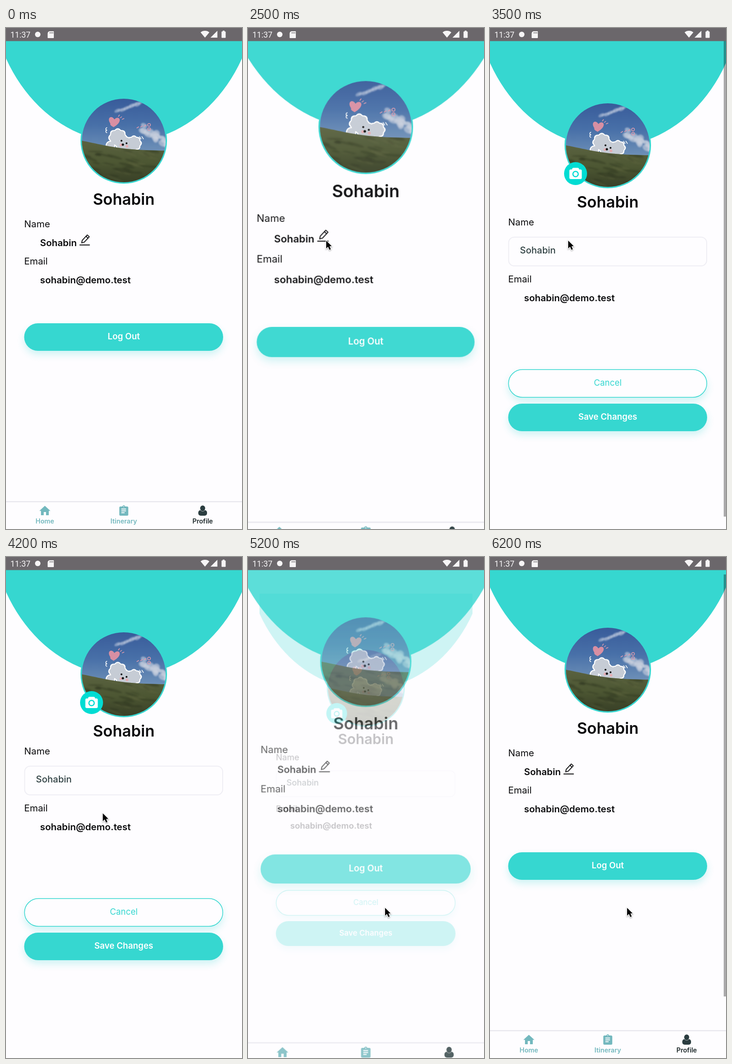
An HTML page with a canvas that plays this animation: 513 px wide and 1091 px high, repeating every 6.3 s.

```html
<!DOCTYPE html>
<html lang="en">
<head>
<meta charset="utf-8">
<title>Profile screen</title>
<style>
  html, body { margin: 0; width: 100%; height: 100%; overflow: hidden; background: #fefdff; }
  canvas { display: block; width: 513px; height: 1091px; }
</style>
</head>
<body>
<canvas id="stage" width="513" height="1091"></canvas>
<script>
const W = 513, H = 1091, BAR = 28, MID = 256, LOOP = 6300, STEP = 100;
const TEAL = '#36d7d0', BADGE = '#02dcd3', PAPER = '#fefdff', INK = '#0b0b0d';
const MUTED = '#73b8be', DARK = '#2b3d40', GREY = '#6b676b', WHITE = '#f6f5f6';
const USER = 'Sohabin', MAIL = 'sohabin@demo.test';
const ctx = document.getElementById('stage').getContext('2d');

// Motion helpers
const ramp = (t, start, length) => Math.min(1, Math.max(0, (t - start) / length));
const mix = (a, b, p) => a + (b - a) * p;
const smooth = p => p * p * (3 - 2 * p);
const easeOut = (p, power) => 1 - (1 - p) ** power;

function seeded(seed) {
  return () => (seed = seed * 16807 % 2147483647) / 2147483647;
}

// Drawing helpers
function text(c, str, x, y, size, weight = 400, color = INK, align = 'left') {
  c.font = `${weight} ${size}px Inter, sans-serif`;
  c.fillStyle = color;
  c.textAlign = align;
  c.fillText(str, x, y);
}

function oval(c, x, y, rx, ry, turn, color) {
  c.fillStyle = color;
  c.beginPath();
  c.ellipse(x, y, rx, ry, turn, 0, Math.PI * 2);
  c.fill();
}

const disc = (c, x, y, r, color) => oval(c, x, y, r, r, 0, color);

function box(c, x, y, w, h, r, color) {
  c.fillStyle = color;
  c.beginPath();
  c.roundRect(x, y, w, h, r);
  c.fill();
}

function frame(c, x, y, w, h, r, color, width) {
  c.strokeStyle = color;
  c.lineWidth = width;
  c.beginPath();
  c.roundRect(x, y, w, h, r);
  c.stroke();
}

function line(c, x, y, dx, dy) {
  c.beginPath();
  c.moveTo(x, y);
  c.lineTo(x + dx, y + dy);
  c.stroke();
}

function gradient(c, y0, y1, ...colors) {
  const g = c.createLinearGradient(0, y0, 0, y1);
  colors.forEach((color, i) => g.addColorStop(i / (colors.length - 1), color));
  return g;
}

function button(c, y, h, label, outlined) {
  c.save();
  c.shadowColor = 'rgba(54,215,208,.24)';
  c.shadowBlur = 16;
  c.shadowOffsetY = 8;
  box(c, 39.5, y, 432.5, h, h / 2, outlined ? PAPER : TEAL);
  c.restore();
  if (outlined) frame(c, 40.25, y + .75, 431, h - 1.5, h / 2, TEAL, 1.5);
  text(c, label, MID, y + h / 2 + 5, 18.5, outlined ? 400 : 600, outlined ? TEAL : '#fff', 'center');
}

// Avatar picture, drawn around its own centre
function clouds(c) {
  const rnd = seeded(11);
  c.filter = 'blur(1.5px)';
  for (let i = 0; i < 9; i++) {
    oval(c, mix(-14, 36, i / 8), mix(-65, -83, i / 8) + rnd() * 3, 7, 2 + rnd() * 3, -.5, 'rgba(205,214,229,.5)');
  }
  for (let i = 0; i < 22; i++) {
    const p = rnd();
    oval(c, mix(36, 90, p) + rnd() * 6, mix(-30, 4, p) + rnd() * 16 - 6, 5 + rnd() * 6, 3 + rnd() * 4, .5, 'rgba(203,210,224,.6)');
  }
  c.filter = 'none';
}

function puff(c, x, y, r, color) {
  disc(c, x, y, r, color);
  for (let a = 0; a < 8; a++) {
    disc(c, x + r * .72 * Math.cos(a * Math.PI / 4), y + r * .72 * Math.sin(a * Math.PI / 4), r * .4, color);
  }
}

function cloudDoodle(c) {
  for (const [grow, color] of [[1.5, '#fff'], [-.8, '#c6ccd5']]) {
    disc(c, -29, 11, 9 + grow, color);
    puff(c, -13, -6, 17 + grow, color);
    puff(c, 22, 6, 14 + grow, color);
    disc(c, 2, 10, 18 + grow, color);
  }
  for (const x of [-6, 7]) disc(c, x, 11 + x / 5, 3, '#e5aeb4');
  for (const x of [-5, 6]) disc(c, x, 3 + x / 2, 2, '#111');
  oval(c, -2, 9, 2.5, 2.5, 0, '#111');
}

function hill(c) {
  c.save();
  c.beginPath();
  c.moveTo(-94, 0);
  c.bezierCurveTo(-40, 10, -10, 22, 94, 22);
  c.lineTo(94, 94);
  c.lineTo(-94, 94);
  c.clip();
  c.fillStyle = gradient(c, 0, 92, '#5a6240', '#4d5733', '#383f26');
  c.fillRect(-94, -2, 188, 96);
  const rnd = seeded(5);
  c.filter = 'blur(1.5px)';
  for (let i = 0; i < 70; i++) {
    const tone = rnd() < .55 ? 'rgba(38,44,26,.3)' : 'rgba(104,108,68,.25)';
    oval(c, rnd() * 188 - 94, rnd() * 90, 6 + rnd() * 16, 1 + rnd() * 2, rnd() * .5, tone);
  }
  c.restore();
}

function heart(c) {
  c.save();
  c.translate(-21, -40);
  c.rotate(.1);
  c.fillStyle = '#d88fa3';
  c.beginPath();
  c.moveTo(0, 11);
  for (const side of [-1, 1]) {
    c.bezierCurveTo(-18, -4 * side, 0, 0, 0, 0);
    c.moveTo(0, 11);
    c.bezierCurveTo(side * 22, -5, side * 8, -17, 0, -6);
    c.lineTo(0, 11);
  }
  c.fill();
  c.restore();
}

function scribbles(c) {
  c.lineWidth = 1.5;
  c.strokeStyle = '#d99aae';
  for (let i = 0; i < 3; i++) {
    line(c, -12 + i * 4, -52 + i * 3, 3 + i, -4 + i);
    line(c, 28 + i * 8, -27 - i * 2, 5, -3);
  }
  for (const y of [-34, -25]) frame(c, 52, y - 3, 6, 6, 3, '#d99aae', 1.5);
  c.strokeStyle = '#f4f6f8';
  for (let i = 0; i < 2; i++) {
    c.beginPath();
    c.arc(-36, -25 + i * 5, 3, 1.6, 4.7);
    c.stroke();
    line(c, 34 + i * 5, -9, 4, 6);
  }
}

function avatar(c, cy) {
  disc(c, MID, cy, 94, TEAL);
  c.save();
  c.translate(MID, cy);
  c.beginPath();
  c.arc(0, 0, 91, 0, Math.PI * 2);
  c.clip();
  c.fillStyle = gradient(c, -92, 25, '#385b9a', '#4870a8', '#6f91b8');
  c.fillRect(-94, -94, 188, 188);
  [clouds, cloudDoodle, hill, heart, scribbles].forEach(paint => paint(c));
  c.restore();
}

// Icons
function pencil(c) {
  c.save();
  c.lineCap = c.lineJoin = 'round';
  c.strokeStyle = INK;
  c.lineWidth = 1.8;
  line(c, 160.5, 472.5, 21, 0);
  c.translate(164.5, 468);
  c.rotate(-.82);
  c.beginPath();
  c.moveTo(0, 0);
  c.lineTo(5, -3);
  c.lineTo(21, -3);
  c.lineTo(21, 3);
  c.lineTo(5, 3);
  c.closePath();
  c.stroke();
  line(c, 17, -3, 0, 6);
  c.restore();
}

function camera(c) {
  disc(c, 186, 317, 25, BADGE);
  box(c, 178.5, 304.5, 15, 8, 3, '#fff');
  box(c, 172.5, 308, 27, 21, 3, '#fff');
  disc(c, 186, 318, 7, BADGE);
  disc(c, 186, 318, 4.5, '#fff');
}

function homeIcon(c, x) {
  c.fillStyle = MUTED;
  c.beginPath();
  c.moveTo(x, 1040.5);
  c.lineTo(x + 12, 1051.5);
  c.lineTo(x - 12, 1051.5);
  c.fill();
  c.fillRect(x - 8.5, 1051, 17, 10);
  box(c, x - 2.5, 1054, 5, 7, 0, PAPER);
}

function listIcon(c, x) {
  disc(c, x, 1042.5, 3, MUTED);
  box(c, x - 9.7, 1042, 19.5, 20, 2.5, MUTED);
  disc(c, x, 1042.5, 1, PAPER);
  for (let i = 0; i < 3; i++) box(c, x - 5.2, 1046.5 + i * 4, i < 2 ? 10 : 7, 2, 0, PAPER);
}

function personIcon(c, x) {
  box(c, x - 9.5, 1050, 19, 12, 5, DARK);
  oval(c, x, 1046, 6, 6.8, 0, PAPER);
  oval(c, x, 1046, 5.4, 6.2, 0, DARK);
}

function navBar(c) {
  box(c, 0, 1030.5, W, 2, 0, '#e5e4eb');
  const tabs = { Home: homeIcon, Itinerary: listIcon, Profile: personIcon };
  Object.entries(tabs).forEach(([name, icon], i) => {
    const x = 84.5 + i * 171.5;
    icon(c, x);
    text(c, name, x, 1079, 14.2, 600, i < 2 ? MUTED : '#1c2729', 'center');
  });
}

// Pages
function header(c, drop, titleY) {
  oval(c, 256.5, -94 + drop, 290, 343, 0, TEAL);
  avatar(c, 245 + drop);
  text(c, USER, MID, titleY, 34, 600, INK, 'center');
}

const label = (c, str, y) => text(c, str, 39.5, y, 20.3);
const value = (c, str, y) => text(c, str, 74, y, 20.3, 600);

function profilePage(c) {
  header(c, 0, 385);
  label(c, 'Name', 434);
  value(c, USER, 474.5);
  pencil(c);
  label(c, 'Email', 515);
  value(c, MAIL, 555.5);
  button(c, 643, 60, 'Log Out');
  navBar(c);
}

function editPage(c) {
  header(c, 10, 391);
  camera(c);
  label(c, 'Name', 429.5);
  frame(c, 40.5, 455.5, 430.5, 62.5, 12, '#efeef4', 2);
  text(c, USER, 65, 490.5, 20, 500, '#304143');
  label(c, 'Email', 554);
  value(c, MAIL, 594.5);
  button(c, 743, 62, 'Cancel', true);
  button(c, 818, 60, 'Save Changes');
}

function renderPage(paint) {
  const layer = document.createElement('canvas');
  layer.width = W;
  layer.height = H - BAR;
  const c = layer.getContext('2d');
  c.fillStyle = PAPER;
  c.fillRect(0, 0, W, H);
  c.translate(0, -BAR);
  paint(c);
  return layer;
}

function placePage(layer, scale, alpha) {
  const w = W * scale, h = (H - BAR) * scale;
  ctx.globalAlpha = alpha;
  ctx.drawImage(layer, (W - w) / 2, (H + BAR - h) / 2, w, h);
  ctx.globalAlpha = 1;
}

// Overlays
function statusBar() {
  box(ctx, 0, 0, W, BAR + .5, 0, GREY);
  ctx.font = '17.5px Roboto, sans-serif';
  ctx.textAlign = 'left';
  ctx.fillStyle = WHITE;
  ctx.fillText('11:37', 9.5, 20.5);
  disc(ctx, 69, 14, 6, WHITE);
  box(ctx, 90.5, 7, 13.5, 15, [5, 1, 1, 1], WHITE);
  for (let x = 95; x < 102; x += 3) box(ctx, x, 9, 1.4, 3, 0, GREY);

  ctx.fillStyle = WHITE;
  ctx.beginPath();
  ctx.moveTo(432.5, 21);
  ctx.arc(432.5, 21, 15, -Math.PI * .72, -Math.PI * .28);
  ctx.fill();
  ctx.beginPath();
  ctx.moveTo(444.5, 21);
  ctx.lineTo(459.5, 6);
  ctx.lineTo(459.5, 21);
  ctx.fill();
  box(ctx, 471, 5.7, 4, 3, 0, WHITE);
  box(ctx, 468.5, 7.5, 9, 14, 1.3, WHITE);
}

const scrollbar = (top, bottom, alpha) =>
  box(ctx, 508, top, 5, bottom - top, 0, `rgba(0,0,0,${.33 * alpha})`);

function pointer(x, y) {
  const shape = new Path2D('M0 0V17L4 13.3L7 20L10 18.7L7.2 12.2L12 12Z');
  ctx.save();
  ctx.translate(x, y);
  ctx.shadowColor = 'rgba(0,0,0,.35)';
  ctx.shadowBlur = 3;
  ctx.shadowOffsetY = 1.5;
  ctx.strokeStyle = '#fff';
  ctx.lineWidth = 2.2;
  ctx.stroke(shape);
  ctx.shadowColor = 'transparent';
  ctx.fillStyle = '#000';
  ctx.fill(shape);
  ctx.restore();
}

const profile = renderPage(profilePage), edit = renderPage(editPage);
const OPEN = 2400, CLOSE = 5099;

function drawPages(t) {
  if (t < CLOSE) {
    const p = easeOut(ramp(t, OPEN, 300), 3);
    placePage(profile, mix(1, 1.135, p), 1 - ramp(t, OPEN + 95, 100));
    placePage(edit, mix(.85, 1, p), ramp(t, OPEN + 100, 100));
  } else {
    const back = easeOut(ramp(t, CLOSE, 400), 2);
    const away = easeOut(ramp(t, CLOSE, 146), 3);
    placePage(profile, mix(1.1, 1, back), ramp(t, CLOSE, 125));
    placePage(edit, mix(1, .9, away), 1 - ramp(t, CLOSE + 1, 131));
  }
}

function draw(t) {
  ctx.fillStyle = PAPER;
  ctx.fillRect(0, 0, W, H);
  drawPages(t);
  if (t >= OPEN + 300 && t < CLOSE) scrollbar(BAR, 1064, 1 - ramp(t, 3600, 300));
  if (t >= CLOSE + 400) scrollbar(38, 957, 1);
  statusBar();

  const enter = smooth(ramp(t, 900, 600)), toCancel = smooth(ramp(t, 3900, 800));
  if (enter > 0) pointer(mix(520, 170, enter) + 128 * toCancel, mix(700, 463, enter) + 301 * toCancel);
}

const start = performance.now();
function tick() {
  const t = (performance.now() - start) % LOOP;
  draw(Math.floor(t / STEP) * STEP);
  requestAnimationFrame(tick);
}
tick();
</script>
</body>
</html>
```
